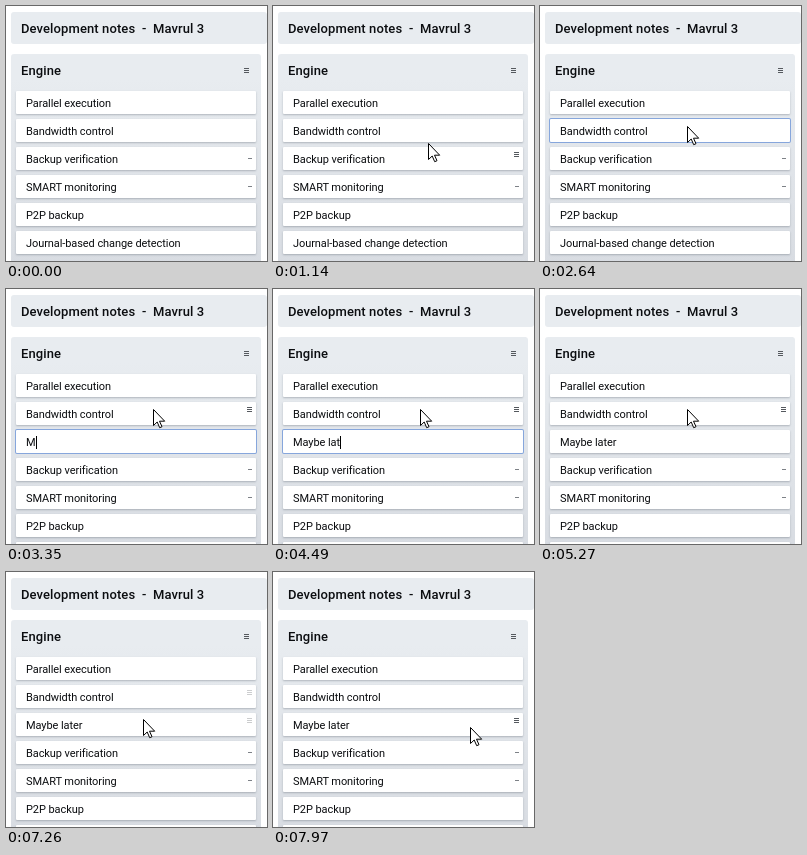
Animation, 261 px wide and 255 px high, one loop 8000 ms. Source, as an HTML page:

```html
<!DOCTYPE html>
<html lang="en">
<head>
<meta charset="utf-8">
<title>Development notes</title>
<style>
  html, body { margin: 0; width: 100%; height: 100%; overflow: hidden; background: #fff; }
  #stage { position: relative; width: 261px; height: 255px; overflow: hidden; font-family: Roboto, sans-serif; color: #0b0d10; white-space: pre; }
  #stage div { position: absolute; }
  .bar { left: 5px; top: 6px; width: 256px; height: 32px; border-radius: 3px; background: #e8ecf0; }
  .column { left: 5px; top: 48px; width: 250px; height: 220px; border-radius: 3px; background: linear-gradient(#e8ecf0 25px, #d8dce2 210px); }
  .head { left: 10px; top: 1px; font-weight: 500; font-size: 13px; line-height: 32px; letter-spacing: .1px; }
  .card { left: 10px; width: 240px; height: 23px; border-radius: 1px; background: #fff; box-shadow: 0 1px 2px rgba(40, 50, 65, .28); }
  .card.edit { box-shadow: 0 0 0 1px #86a6dc; }
  .label { left: 10px; top: 1px; font-size: 11px; line-height: 24px; letter-spacing: -.08px; }
  .label i { display: inline-block; width: 1px; height: 13px; margin-right: -1px; background: #000; vertical-align: -3px; }
  .menu { width: 5px; height: 5px; background: repeating-linear-gradient(#55595e 0 1px, transparent 1px 2px); }
  .card .menu { left: 231px; top: 5px; }
  .column > .menu { left: 233px; top: 14px; }
  .dash { left: 232px; top: 11px; width: 4px; height: 1px; background: #7d8187; }
  #cursor { position: absolute; left: 0; top: 0; overflow: visible; }
</style>
</head>
<body>
<div id="stage">
  <div class="bar"><div class="head">Development notes  -  Mavrul 3</div></div>
  <div class="column"><div class="head">Engine</div><div class="menu"></div></div>
  <svg id="cursor" width="13" height="20">
    <path d="M.5 .5V16.5L4.2 13L6.7 18.7L9 17.7L6.5 12.2H11.7Z" fill="#fff" stroke="#000"/>
  </svg>
</div>
<script>
const LOOP = 8000, ENTER = 930, CLICK = 1780, INSERT = 2700, COMMIT = 5270;
const TEXT = 'Maybe later', FIRST_KEY = 3290, KEY_GAP = 150;
const BLINK = 530, FADE = 200;

const easeOut = p => 1 - (1 - p) ** 6;
const easeInOut = p => p * p * (3 - 2 * p);
const clamp = v => Math.max(0, Math.min(1, v));

const origin = { x: 200, y: 231 };
const legs = [
  { from: ENTER, to: 1720, x: 147, y: 120, ease: easeOut },
  { from: 6700, to: 7260, x: 137, y: 147, ease: easeInOut },
  { from: 7260, to: 7620, x: 179, y: 155, ease: easeInOut },
  { from: 7850, to: 7970, x: 197, y: 155, ease: easeInOut }
];

const stage = document.getElementById('stage');
const cursor = document.getElementById('cursor');

function add(parent, cls) {
  const el = document.createElement('div');
  el.className = cls;
  parent.appendChild(el);
  return el;
}

// hover is the time span in which the pointer is over the card
function makeCard(text, { hover, dashed } = {}) {
  const card = add(stage, 'card');
  const label = add(card, 'label');
  label.textContent = text;
  const menu = add(card, 'menu');
  menu.style.opacity = 0;
  return { card, label, menu, text, hover, dash: dashed && add(card, 'dash') };
}

const rows = [
  makeCard('Parallel execution'),
  makeCard('Bandwidth control', { hover: [1145, 7120] }),
  makeCard('Backup verification', { hover: [940, 1145], dashed: true }),
  makeCard('SMART monitoring', { dashed: true }),
  makeCard('P2P backup'),
  makeCard('Journal-based change detection')
];
const bandwidth = rows[1];
const added = makeCard('', { hover: [7200, LOOP] });
const expanded = [...rows.slice(0, 2), added, ...rows.slice(2)];
stage.appendChild(cursor);

function menuOpacity([from, to], t) {
  return clamp((t - from) / FADE) - clamp((t - to) / FADE);
}

function pointer(t) {
  let { x, y } = origin;
  for (const leg of legs) {
    const p = leg.ease(clamp((t - leg.from) / (leg.to - leg.from)));
    x += (leg.x - x) * p;
    y += (leg.y - y) * p;
  }
  return `translate(${Math.round(x)}px, ${Math.round(y)}px)`;
}

function setLabel(row, text, caret) {
  const html = text + (caret ? '<i></i>' : '');
  if (row.html !== html) row.label.innerHTML = row.html = html;
}

function draw(t) {
  const open = t >= INSERT;
  const editing = t >= CLICK && !open;
  const typing = open && t < COMMIT;

  added.card.style.display = open ? '' : 'none';
  (open ? expanded : rows).forEach((row, i) => {
    row.card.style.top = 85 + 28 * i + 'px';
    if (!row.hover) return;
    const shown = row === bandwidth && editing ? 0 : menuOpacity(row.hover, t);
    row.menu.style.opacity = shown;
    if (row.dash) row.dash.style.opacity = 1 - shown;
  });

  bandwidth.card.classList.toggle('edit', editing);
  setLabel(bandwidth, bandwidth.text, editing && t < CLICK + BLINK);

  const keys = Math.floor((t - FIRST_KEY) / KEY_GAP) + 1;
  const count = Math.max(0, Math.min(TEXT.length, keys));
  const lastKey = count ? FIRST_KEY + (count - 1) * KEY_GAP : INSERT;
  added.card.classList.toggle('edit', typing);
  setLabel(added, TEXT.slice(0, count), typing && t - lastKey < BLINK);

  cursor.style.display = t >= ENTER ? '' : 'none';
  cursor.style.transform = pointer(t);
}

const start = performance.now();
function tick() {
  draw((performance.now() - start) % LOOP);
  requestAnimationFrame(tick);
}
tick();
</script>
</body>
</html>
```
